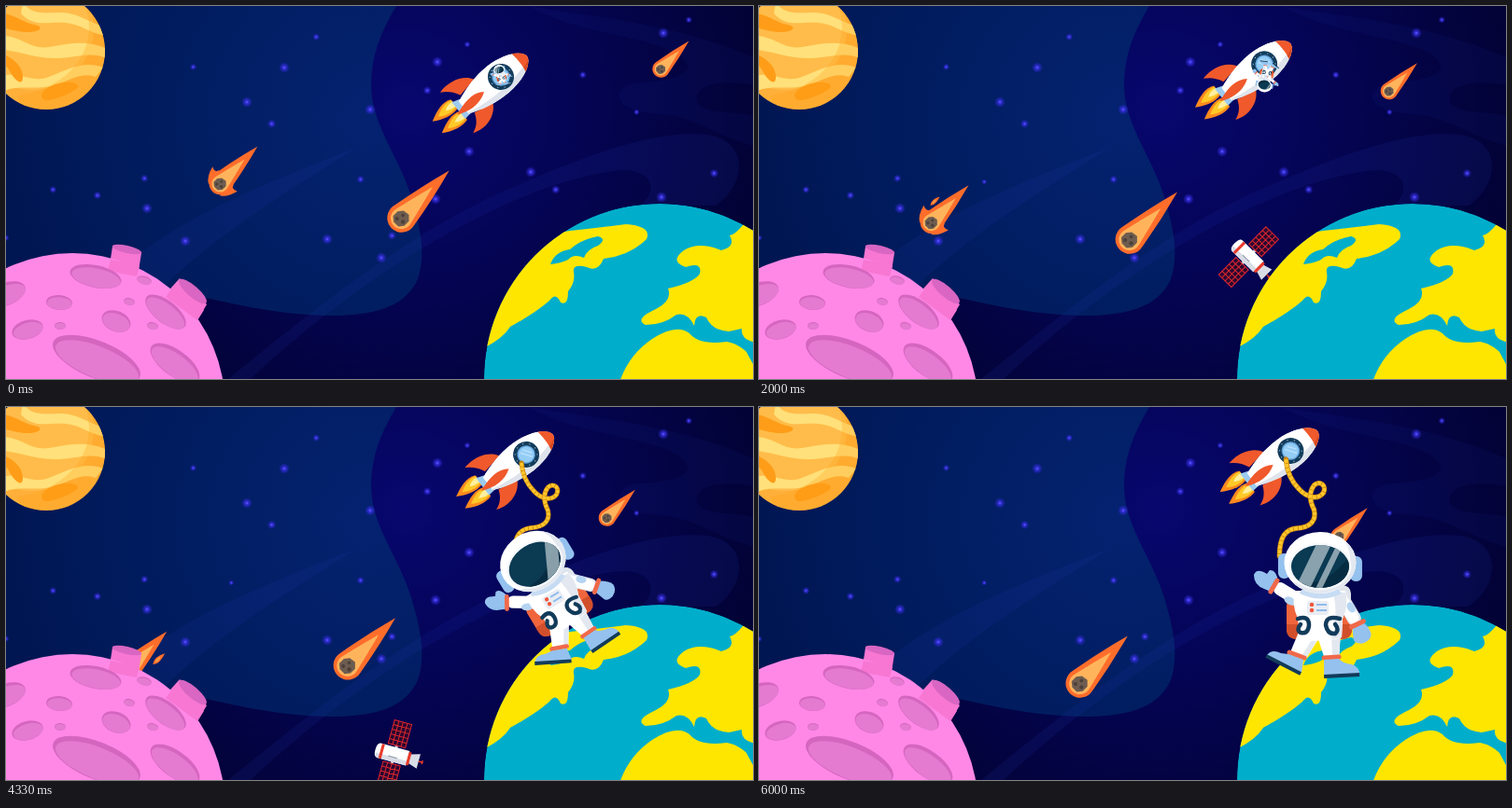
Animation of 800x400 px, one loop 6080 ms. Source, as an HTML page:

```html
<!DOCTYPE html>
<html lang="en">
<head>
<meta charset="utf-8">
<title>Space walk</title>
<style>
  html, body { margin: 0; width: 100%; height: 100%; overflow: hidden; background: #03034a; }
  svg { display: block; width: 800px; height: 400px; }
</style>
</head>
<body>
<svg viewBox="0 0 800 400">
  <defs>
    <radialGradient id="night" gradientUnits="userSpaceOnUse" cx="430" cy="110" r="400">
      <stop offset="0" stop-color="#07076f"/><stop offset=".5" stop-color="#040451"/><stop offset="1" stop-color="#020233"/>
    </radialGradient>
    <radialGradient id="haze" gradientUnits="userSpaceOnUse" cx="390" cy="120" r="400">
      <stop offset="0" stop-color="#042270"/><stop offset=".55" stop-color="#011d60"/><stop offset="1" stop-color="#001652"/>
    </radialGradient>
    <radialGradient id="glow">
      <stop offset="0" stop-color="#6a62ff"/><stop offset=".25" stop-color="#3c34e8" stop-opacity=".9"/>
      <stop offset="1" stop-color="#2a22d0" stop-opacity="0"/>
    </radialGradient>
    <clipPath id="sunClip"><circle cx="43" cy="48" r="63"/></clipPath>
    <clipPath id="earthClip"><circle cx="700" cy="400" r="188"/></clipPath>
    <clipPath id="visorClip"><ellipse cy="4" rx="31" ry="23"/></clipPath>
    <clipPath id="hullClip"><path id="hull" d="M36 0C35 -8 20 -18 -4 -18.5C-24 -18.500 -40 -13 -52 -8V9C-40 14 -24 18.500 -4 18.500C20 18 35 8 36 0Z"/></clipPath>
    <g id="crater">
      <circle r="1" fill="#d566bf"/>
      <ellipse cx=".03" cy=".12" rx=".95" ry=".84" fill="#e57bd1"/>
    </g>
    <g id="meteor">
      <path fill="#ff6d2b" d="M73 0Q40 -9 5 -15A15.500 15.500 0 1 0 5 15Q40 9 73 0Z"/>
      <path fill="#ffb45c" d="M48 0Q25 -6 4 -11A11.500 11.500 0 1 0 4 11Q25 6 48 0Z"/>
      <path fill="#6d5c50" d="M-8 -3L-4 -8L3 -8L8 -4L9 3L4 8L-3 8L-8 4Z"/>
      <g fill="#4c4039"><circle cx="-3" cy="-3" r="2"/><circle cx="4" cy="-1" r="1.800"/><circle cx="-1" cy="4" r="2.200"/></g>
    </g>
    <g id="fleck">
      <path fill="#ff6d2b" d="M13 0Q-1 -8 -10 -1Q-4 6 13 0Z"/>
      <path fill="#ff9a45" d="M6 -1Q-1 -4 -6 -1Q-2 3 6 -1Z"/>
    </g>
    <g id="flame">
      <path fill="#ff8a1e" d="M-57 -6C-66 -10 -76 -6 -87 0C-77 6 -66 9 -57 6Z"/>
      <path fill="#ffc928" d="M-57 -5C-64 -7 -71 -5 -79 0C-71 5 -64 6 -57 4Z"/>
      <path fill="#fff0a0" d="M-57 -3Q-64 -4 -69 0Q-64 3 -57 3Z"/>
    </g>
  </defs>

  <rect width="800" height="400" fill="url(#night)"/>
  <path fill="url(#haze)" d="M0 0H418C400 30 391 55 391 85C391 130 425 165 437 215C447 250 448 275 440 295C425 325 390 332 345 332C270 330 220 312 150 300L0 280Z"/>
  <g fill="#2038b0">
    <path opacity=".12" d="M375 152C290 185 200 220 130 275L170 300C230 240 310 195 375 152Z"/>
    <path opacity=".12" d="M238 400C330 325 430 245 530 200C610 165 690 132 750 138C795 143 795 190 760 214H680C700 195 690 176 660 176C560 185 400 270 262 400Z"/>
    <path opacity=".08" d="M560 0C650 15 720 20 800 55V85C770 78 735 84 740 102C745 118 790 112 800 118V150C750 135 740 118 690 115C650 112 645 85 680 82C720 80 745 70 720 52C690 32 610 30 560 0Z"/>
  </g>
  <g id="stars" fill="url(#glow)"></g>

  <g clip-path="url(#sunClip)">
    <path fill="#ffb03a" d="M-20 -15H106V111H-20Z"/>
    <circle cx="28" cy="24" r="66" fill="#ffbc4a"/>
    <g fill="#ffe07a">
      <path d="M18 -4C30 14 50 4 68 8S92 20 108 22V32C90 30 82 20 64 18S30 24 16 8Z"/>
      <path d="M-10 34C10 26 24 48 46 44S88 36 108 46V56C90 48 74 56 52 56S14 48 -10 46Z"/>
      <path d="M-10 78C10 66 26 84 46 76S84 58 104 66L96 76C80 70 66 82 48 86S10 84 -4 92Z"/>
    </g>
    <g fill="#ff9d18">
      <path d="M-6 8C8 8 18 18 30 20S36 28 24 28S2 24 -8 22Z"/>
      <path d="M-8 50C6 54 18 64 18 76S8 78 4 70S-4 62 -10 62Z"/>
      <path d="M38 95C42 85 64 79 74 83S66 95 54 99S38 101 38 95Z"/>
    </g>
    <path fill="#ff9d18" opacity=".28" d="M82 -8C104 40 72 88 12 96L20 120H120V-10Z"/>
  </g>

  <g id="m1">
    <path id="spike" fill="#ff6d2b" d="M-11 -11Q-6 -20 10 -24Q5 -16 15 -10Z"/>
    <use href="#spike" transform="scale(1 -1)"/>
    <use id="fleckL" href="#fleck"/><use id="fleckR" href="#fleck"/>
    <use href="#meteor"/>
  </g>
  <use id="m2" href="#meteor"/>
  <use id="m3" href="#meteor"/>

  <g id="satellite">
    <path stroke="#c9ced6" stroke-width="3" d="M0 -12V12"/>
    <g id="panel">
      <path fill="#2a0830" d="M-9.500 -36h19v26h-19z"/>
      <path stroke="#e0262e" fill="none" d="M-9.500 -36h19v26h-19zM-4.700 -36v26M0 -36v26M4.700 -36v26M-9.500 -30.800h19M-9.500 -25.600h19M-9.500 -20.400h19M-9.500 -15.200h19"/>
    </g>
    <use href="#panel" transform="scale(1 -1)"/>
    <path fill="#fff" d="M-17 -8H15V8H-17Q-21 8 -21 0T-17 -8Z"/>
    <path fill="#d9dde5" d="M-20 3H15V8H-17Q-20 7 -20 3ZM17 -5L27 -8V8L17 5Z"/>
    <path stroke="#ea3a2a" stroke-width="3" d="M-14 -8V8M16 -7V7"/>
    <path stroke="#ea3a2a" stroke-width="1.500" d="M27 0H32M31 -2V2"/>
    <path stroke="#8b95a5" d="M-6 3H4"/>
  </g>

  <g fill="#f777d2">
    <path d="M114 258L109 290L140 296L145 265Z"/>
    <path d="M186 292L168 312L202 342L215 320Z"/>
    <circle cx="71" cy="428.500" r="163.500" fill="#ff88e7"/>
    <path d="M112 272L109 284L140 290L143 278ZM180 300L171 312L205 337L212 326Z"/>
    <ellipse rx="16" ry="4" fill="#d866c2" transform="translate(129.500 261) rotate(13)"/>
    <ellipse rx="19" ry="6" fill="#d866c2" transform="translate(200 306) rotate(41)"/>
  </g>
  <use href="#crater" transform="translate(96 290) rotate(12) scale(28 12)"/>
  <use href="#crater" transform="translate(148 294) rotate(15) scale(8 4.500)"/>
  <use href="#crater" transform="translate(57 318) rotate(5) scale(14 8)"/>
  <use href="#crater" transform="translate(118 338) rotate(22) scale(16 11)"/>
  <use href="#crater" transform="translate(132 317) rotate(15) scale(6 4)"/>
  <use href="#crater" transform="translate(171 328) rotate(38) scale(26 12)"/>
  <use href="#crater" transform="translate(23 347) rotate(-15) scale(17 10)"/>
  <use href="#crater" transform="translate(58 343) scale(6 4)"/>
  <use href="#crater" transform="translate(157 343) rotate(15) scale(6 4)"/>
  <use href="#crater" transform="translate(0 309) rotate(-22) scale(22 12)"/>
  <use href="#crater" transform="translate(97 379) rotate(22) scale(50 20)"/>
  <use href="#crater" transform="translate(181 383) rotate(36) scale(31 14)"/>

  <g clip-path="url(#earthClip)" fill="#ffe600">
    <circle cx="700" cy="400" r="188" fill="#00aecb"/>
    <path d="M500 372Q530 360 540 344S566 330 582 316Q589 306 594 318Q602 322 602 306Q610 296 608 286T622 280Q634 286 640 271Q668 268 686 250Q692 236 664 234Q632 238 604 241L490 260Z"/>
    <path d="M790 234Q780 246 775 246Q782 258 766 262Q742 252 726 262Q710 274 728 280Q746 274 743 287Q738 296 709 303Q714 316 696 325Q672 336 685 342Q704 342 718 331Q730 328 737 343Q738 328 750 334Q756 348 774 349L788 346Q786 360 810 362L850 240Z"/>
    <path d="M655 410Q664 376 692 357Q718 340 732 351Q742 364 772 360Q794 364 806 390V420Z"/>
    <path fill="#00aecb" d="M583 277Q588 263 604 261Q616 250 634 247Q644 250 634 257Q622 261 619 270Q608 265 602 272Q594 276 583 277ZM793 371L800 374V384Z"/>
  </g>

  <g id="rocket">
    <use href="#flame" y="-9"/><use href="#flame" y="7"/>
    <g fill="#f0592b">
      <path d="M-24 -16C-30 -27 -46 -32 -61 -28C-54 -24 -50 -20 -46 -12Z"/>
      <path d="M-24 16C-30 28 -46 34 -61 28C-53 25 -49 20 -46 12Z"/>
    </g>
    <path fill="#9ccbef" d="M-49 -9L-58 -12V11L-49 10Z"/>
    <g clip-path="url(#hullClip)">
      <use href="#hull" fill="#fff"/>
      <path fill="#dfe4ec" d="M-55 7C-30 13 10 15 40 1V20H-55Z"/>
      <path fill="#f0592b" d="M23 -20Q28 0 23 20H45V-20Z"/>
      <path fill="#d84a20" d="M25 8Q32 6 40 0V20H23Z"/>
    </g>
    <path fill="#f0592b" d="M-24 1C-34 -6 -46 -4 -62 2C-48 9 -34 8 -24 1Z"/>
    <circle r="14" fill="#123b5a"/>
    <circle r="11.800" fill="none" stroke="#8fb4cf" stroke-width="1.300" stroke-linecap="round" stroke-dasharray=".1 7.300"/>
    <circle r="9.800" fill="#5f9fd8"/><circle r="8.500" fill="#93cdf6"/>
    <path stroke="#b9e0fb" stroke-width="1.500" d="M-4 -5L4 6M0 -6L6 2"/>
  </g>

  <g id="rope" fill="none">
    <path class="cord" stroke="#c98510" stroke-width="5.400" stroke-linecap="round"/>
    <path class="cord" stroke="#ffc62a" stroke-width="4" stroke-dasharray="4 .8"/>
  </g>

  <g id="astro"><g transform="translate(3 -55)">
    <rect x="4" y="24" width="29" height="40" rx="9" fill="#dfe4ec"/>
    <rect x="-36" y="36" width="70" height="46" rx="11" fill="#f0653c"/>
    <path fill="#d24f2b" d="M-36 66H34V72Q34 82 22 82H-24Q-36 82 -36 72Z"/>
    <path fill="#fff" d="M-22 72L-33 98L-16 104L-2 82L5 104L20 104L22 72Z"/>
    <path fill="#e3e8f0" d="M12 76L13 104H20L22 74ZM-10 84L-21 102L-16 104L-4 84Z"/>
    <path stroke="#f0694a" stroke-width="5" stroke-linecap="round" d="M-33 96L-17 102M4 102L20 101"/>
    <path fill="#94c1ee" d="M-34 98L-18 104L-20 118L-57 99Q-52 92 -42 97ZM4 104L20 103Q24 108 34 109Q42 112 42 119L4 121Z"/>
    <path stroke="#123b5a" stroke-width="4" d="M-58 100L-21 119M4 122L42 120"/>
    <g id="arm">
      <path fill="none" stroke="#e3e8f0" stroke-width="15" stroke-linecap="round" d="M-2 3L10 24"/>
      <path fill="none" stroke="#fff" stroke-width="12" stroke-linecap="round" d="M-3 3L9 23"/>
      <ellipse rx="4" ry="6" fill="#b5d4f2" transform="translate(7 12) rotate(-30)"/>
      <path fill="#94c1ee" d="M8 34L20 28Q28 36 28 42Q27 49 18 51Q10 51 9 46Z"/>
      <path stroke="#f0694a" stroke-width="5" stroke-linecap="round" d="M7 33L20 27"/>
    </g>
    <path fill="none" stroke="#fff" stroke-width="14" stroke-linecap="round" d="M-25 39L-43 28"/>
    <ellipse rx="7" ry="4" fill="#b5d4f2" transform="translate(-32 41) rotate(25)"/>
    <path fill="#94c1ee" d="M-53 31L-45 20Q-47 7 -54 8L-57 12Q-68 5 -71 13Q-71 24 -60 28Z"/>
    <path stroke="#f0694a" stroke-width="5" stroke-linecap="round" d="M-53 31L-46 19"/>
    <path fill="#fff" d="M-27 30H27Q31 44 24 60L23 80Q0 88 -22 79L-24 60Q-31 44 -27 30Z"/>
    <path fill="#e3e8f0" d="M14 32H27Q31 44 24 60L23 80L12 82Q20 58 14 32Z"/>
    <path fill="#c7dcf3" d="M-22 33Q0 44 23 33L20 29H-20Z"/>
    <rect x="-14" y="41" width="23" height="15" rx="3" fill="#e9edf4"/>
    <path stroke="#8fbcec" stroke-width="2" d="M-4 45H7M-4 51H7"/>
    <g fill="#f0583c"><circle cx="-9" cy="45" r="2.300"/><circle cx="-9" cy="51" r="2.300"/></g>
    <g fill="none" stroke="#123b5a" stroke-width="4.500" stroke-linecap="round">
      <path d="M-24 60Q-12 56 -12 67Q-13 77 -21 75Q-26 72 -21 66"/>
      <path d="M21 60Q6 56 6 67Q8 77 16 76Q21 72 16 66"/>
    </g>
    <g fill="#94c1ee"><rect x="-45" y="-10" width="13" height="27" rx="6"/><rect x="32" y="-7" width="13" height="27" rx="6"/></g>
    <ellipse rx="38.500" ry="33" fill="#fff"/>
    <path fill="#e3e8f0" d="M26 -24Q39 -14 38.500 0Q36 30 0 33Q-20 32 -30 20Q10 36 30 10Q36 -8 26 -24Z"/>
    <ellipse cy="4" rx="33.500" ry="25.500" fill="#f6f8fb"/>
    <ellipse cy="4" rx="31" ry="23" fill="#0b3a53"/>
    <g clip-path="url(#visorClip)">
      <path fill="#062c42" d="M-40 16Q0 36 32 -8V40H-40Z"/>
      <path id="shine" fill="#a9bcc4" opacity=".8" d="M-2 -30H14L-18 36H-34ZM20 -30H27L-5 36H-12Z"/>
    </g>
  </g></g>
</svg>
<script>
const LOOP = 6.08, FPS = 12, FRAMES = 73;
const $ = id => document.getElementById(id);
const clamp = v => Math.min(Math.max(v, 0), 1);
const mix = (a, b, u) => a + (b - a) * u;
const easeOut = u => Math.sin(clamp(u) * Math.PI / 2);

function place(id, x, y, turn = 0, scale = 1) {
  $(id).setAttribute('transform', `translate(${x} ${y}) rotate(${turn}) scale(${scale})`);
}

// A few bright stars, then a seeded scatter of faint ones.
let seed = 7;
const random = () => (seed = seed * 16807 % 2147483647) / 2147483647;
function star(x, y, r) {
  $('stars').insertAdjacentHTML('beforeend', `<circle cx="${x}" cy="${y}" r="${r}"/>`);
}
[[298, 66], [258, 103], [390, 111], [462, 60], [496, 156], [562, 178], [704, 29],
 [702, 205], [402, 270], [344, 250], [192, 252], [151, 217], [460, 207]].forEach(([x, y]) => star(x, y, 6));
for (let i = 0; i < 18; i++) star(i * 44 + random() * 30, random() * 270, 3 + random() * 2);

function meteor(id, t, x, y, vx, vy, scale) {
  place(id, x + vx * t, y + vy * t, -45, scale);
}

// A spark that grows, drifts back along the tail and burns out.
function fleck(id, t, side, from, life) {
  const u = clamp((t - from) / life);
  place(id, 8 + 44 * u, side * (14 + 8 * u), 0, (.4 + u) * (1 - u ** 6));
}

// The upper coil keeps its shape; only the last bend reaches for the astronaut.
function drawRope(x, y, grow, reach) {
  const k = Math.max(grow, .001);
  const d = `M0 0C1 14 6 24 14 32C22 41 34 44 40 36C44 28 36 22 30 28C24 36 26 46 30 54
    C33 66 26 73 12 74C0 75 -7 82 -7 ${104 * reach / k}`;
  document.querySelectorAll('.cord').forEach(cord => cord.setAttribute('d', d));
  $('rope').style.display = grow ? '' : 'none';
  place('rope', x, y, 0, k);
}

function draw(t) {
  const u = t / LOOP, left = LOOP - t;

  meteor('m1', t, 229, 191, -22.4, 20.8, .78);
  meteor('m2', t, 423, 228, -13.3, 11.5, 1);
  meteor('m3', t, 701, 68, -13.3, 11.8, .59);
  fleck('fleckL', t, -1, 1.2, 2.2);
  fleck('fleckR', t, 1, 2.6, 2.6);

  // The satellite spirals out from the centre of the earth.
  const orbit = (66.5 - 15.6 * t + .35 * t * t) * Math.PI / 180, radius = 162 + 28.5 * t;
  place('satellite', 700 - radius * Math.cos(orbit), 400 - radius * Math.sin(orbit), 69.6 - 12.5 * t);

  const x = 530 + 40 * u ** 1.15, y = 76 - 29 * (1 - (1 - u) ** 1.6);
  place('rocket', x, y, -39 + 3 * u);

  // The astronaut leaves the porthole, growing and turning upright.
  const walk = clamp((t - 1.85) / 3.2), rise = easeOut(walk);
  drawRope(x - 5, y + 9, rise, (rise + walk) / 2);
  place('astro', mix(x, 598, walk), mix(y, 222, rise), -10.2 * left * left, mix(.15, 1, rise));
  place('arm', 26, 36, -28 * clamp(left / 3.25));
  place('shine', (28 * t + 27) % 77 - 38, 0);
}

let start;
function tick(now) {
  start ??= now;
  // The motion holds twelve poses a second.
  const time = (now - start) / 1000 % LOOP;
  draw(Math.min(Math.floor((time + .004) * FPS), FRAMES - 1) / FPS);
  requestAnimationFrame(tick);
}
draw(0);
requestAnimationFrame(tick);
</script>
</body>
</html>
```
